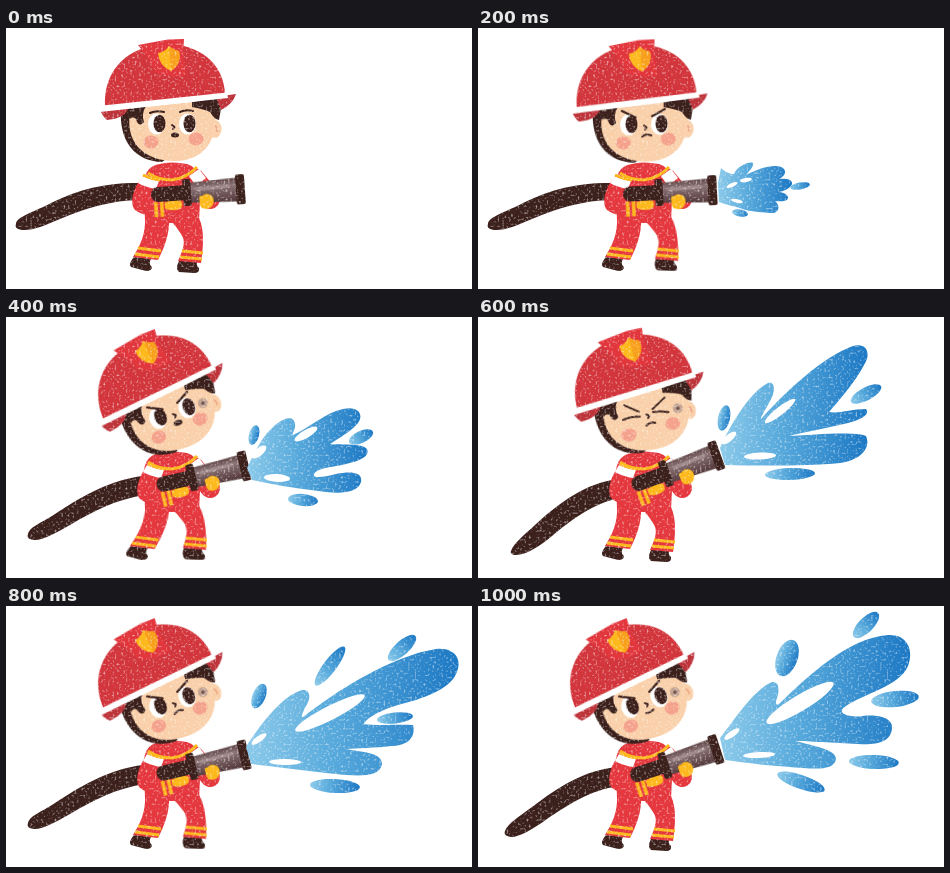
Animation, 466 px wide and 261 px high, one loop 1.2 s. Source, as an HTML page:

```html
<!DOCTYPE html>
<html lang="en">
<head>
<meta charset="utf-8">
<title>Firefighter with hose</title>
<style>
html, body { margin: 0; width: 100%; height: 100%; overflow: hidden; background: #fff; }
svg { display: block; width: 100%; height: 100%; }

/* one pose = 200 ms of a 1200 ms loop */
.p { opacity: 0; animation: show 1.2s step-end infinite; }
.p1 { animation-delay: -1s; }
.p2 { animation-delay: -.8s; }
.p3 { animation-delay: -.6s; }
.p4 { animation-delay: -.4s; }
.p5 { animation-delay: -.2s; }
@keyframes show { 0% { opacity: 1 } 16.66% { opacity: 0 } }

#head, #gun, #hose, #arm, #legL, #legR, #smudge { animation: 1.2s step-end infinite; }
#head { transform-origin: 168px 95px; animation-name: head; }
#gun { animation-name: gun; }
#hose { animation-name: hose; }
#arm { animation-name: arm; }
#legL { transform-origin: 150px 193px; animation-name: legL; }
#legR { transform-origin: 180px 193px; animation-name: legR; }
#smudge { animation-name: smudge; }

@keyframes head {
  0% { transform: none }
  16.66% { transform: translate(0, .5px) rotate(-1deg) }
  33.33%, 66.66%, 83.33% { transform: translate(0, -.5px) rotate(-20deg) }
  50% { transform: translate(2px, 0) rotate(-11deg) }
}
@keyframes gun {
  0% { transform: translate(181px, 165px) rotate(-4deg) }
  16.66% { transform: translate(181px, 165px) rotate(-3deg) }
  33.33%, 66.66% { transform: translate(186px, 161px) rotate(-13deg) }
  50% { transform: translate(188px, 157px) rotate(-20deg) }
  83.33% { transform: translate(187px, 160px) rotate(-18deg) }
}
@keyframes hose {
  0%, 16.66% { d: path("M10 196C10 189 28 184 45 175C75 160 105 154 134 155L134 172C105 172 78 181 54 191C40 197 26 203 16 202C10 201 9 199 10 196Z") }
  33.33%, 66.66% { d: path("M22 217C24 209 38 205 52 195C80 177 105 163 137 159L140 178C110 182 88 194 64 208C50 216 36 224 27 223C22 222 21 220 22 217Z") }
  50% { d: path("M33 234C36 226 45 219 57 208C82 185 108 166 140 162L142 181C115 186 92 204 74 219C62 229 48 238 38 238C34 238 32 236 33 234Z") }
  83.33% { d: path("M27 225C30 217 42 210 54 201C82 180 105 165 138 161L141 180C112 184 90 199 69 213C55 223 42 231 33 231C27 230 26 228 27 225Z") }
}
@keyframes arm {
  0%, 16.66% { transform: none }
  33.33% { transform: translate(5px, 0) }
}
@keyframes legL {
  0%, 50% { transform: none }
  33.33% { transform: skewX(-5deg) }
}
@keyframes legR {
  0%, 50%, 83.33% { transform: none }
  16.66%, 33.33%, 66.66% { transform: translate(0, -2px) skewX(7deg) }
}
@keyframes smudge { 0% { opacity: 0 } 33.33% { opacity: 1 } }

.red { fill: #e5383e; }
.helmet { fill: #d2363c; }
.brim { fill: #bd343a; }
.dark { fill: #3b201c; }
.gold { fill: #fdb91c; }
.skin { fill: #f9d0a9; }
.cheek { fill: #f5a28c; }
.line { fill: none; stroke: #3b201c; stroke-width: 2; stroke-linecap: round; stroke-linejoin: round; }
.band { fill: none; stroke: #fdb91c; stroke-width: 3; }
.water { fill: url(#sea); }
.white { fill: #fff; }
</style>
</head>
<body>
<svg viewBox="0 0 466 261" preserveAspectRatio="none">
<defs>
  <linearGradient id="sea">
    <stop offset="0" stop-color="#8ccaea"/>
    <stop offset=".4" stop-color="#58aadc"/>
    <stop offset="1" stop-color="#1c78c4"/>
  </linearGradient>
  <linearGradient id="steel" x2="0" y2="1">
    <stop offset="0" stop-color="#5b4142"/>
    <stop offset=".3" stop-color="#8b7375"/>
    <stop offset=".55" stop-color="#765d5f"/>
    <stop offset="1" stop-color="#513638"/>
  </linearGradient>
  <!-- chalky brush grain -->
  <filter id="grain" filterUnits="userSpaceOnUse" x="0" y="0" width="466" height="261" color-interpolation-filters="sRGB">
    <feTurbulence type="fractalNoise" baseFrequency=".45" numOctaves="1" seed="4"/>
    <feColorMatrix values="0 0 0 0 1  0 0 0 0 1  0 0 0 0 1  2 0 0 0 -1.08"/>
    <feComposite in2="SourceGraphic" operator="in" result="specks"/>
    <feMerge><feMergeNode in="SourceGraphic"/><feMergeNode in="specks"/></feMerge>
  </filter>
  <g id="eyes">
    <ellipse class="white" cx="150.500" cy="96" rx="8.500" ry="10.500"/>
    <ellipse class="white" cx="181.500" cy="96" rx="8.500" ry="10.500"/>
    <ellipse class="dark" cx="153.500" cy="95.500" rx="6" ry="8.800"/>
    <ellipse class="dark" cx="183.500" cy="95.500" rx="6" ry="8.800"/>
  </g>
  <path id="frown" class="line" d="M144 82L158 89M174 88L187 81"/>
  <path id="sulk" class="line" d="M164 108Q168 104.500 173 107"/>
</defs>

<g filter="url(#grain)">
<path id="hose" class="dark" d="M10 196C10 189 28 184 45 175C75 160 105 154 134 155L134 172C105 172 78 181 54 191C40 197 26 203 16 202C10 201 9 199 10 196Z"/>

<!-- legs -->
<g id="legR">
  <path class="dark" d="M173 233L191 233Q190 238 193 240Q194 245 188 245L173 244Q169 241 173 233Z"/>
  <path class="red" d="M164 190L193 190C199 203 197 220 195 235L172 233C178 220 180 213 175 206Q170 198 164 192Z"/>
  <path class="band" d="M176 223L197 225M174 229L196 231"/>
</g>
<g id="legL">
  <path class="dark" d="M128 229L145 231Q142 236 146 239Q146 243 140 243L125 239Q122 236 128 229Z"/>
  <path class="red" d="M139 189L163 190C164 206 158 220 152 232L127 229C134 218 140 206 139 189Z"/>
  <path class="band" d="M132 220L155 223M129 226L153 229"/>
</g>

<!-- jacket -->
<path d="M188 150Q197 160 204 171" fill="none" stroke="#e5383e" stroke-width="20" stroke-linecap="round"/>
<path class="red" d="M147 138Q162 132 181 136Q192 139 195 153L193 193Q166 197 139 193L138 156Q138 143 147 138Z"/>
<path class="white" d="M183 148L193 141L200 150L190 158Z"/>
<path class="band" d="M142 145Q152 152 166 152Q181 150 191 139"/>
<g id="arm">
  <path class="red" d="M138 147C127 158 123 176 129 182Q138 189 151 187L151 170L145 168L153 152Z"/>
  <path class="white" d="M136 148Q144 152 153 153L150 161Q139 159 132 155Z"/>
  <path class="band" d="M137 147Q145 151 154 152" stroke-width="2"/>
</g>

<!-- nozzle -->
<g id="gun">
  <path class="red" d="M-42 5H-22V22H-40Z"/>
  <path d="M-32 7V22M-26 7V22" fill="none" stroke="#fdb91c" stroke-width="3.500"/>
  <path class="gold" d="M-23 8Q-12 5 -6 8Q-4 15 -11 16Q-18 17 -23 14Z"/>
  <rect class="dark" x="-36" y="-8" width="44" height="15" rx="7"/>
  <path d="M3 -10L52 -12V12L3 10Z" fill="url(#steel)"/>
  <path d="M10 -3L42 -4" stroke="#a08a8c" stroke-width="3.500" stroke-linecap="round"/>
  <rect class="dark" x="-4" y="-14" width="8" height="27" rx="2"/>
  <rect class="dark" x="49" y="-15" width="9" height="30" rx="2"/>
  <path class="gold" d="M12 9Q11 3 15 4Q18 1 22 3Q27 5 26 11Q24 18 17 17Q11 16 12 9Z"/>
</g>

<!-- head -->
<g id="head">
  <ellipse class="skin" cx="209" cy="101" rx="6.500" ry="9"/>
  <path d="M207 98Q212 97 211 104" fill="none" stroke="#eca584" stroke-width="1.500"/>
  <path class="dark" d="M115 82L130 78C124 105 134 124 160 131L156 134C128 133 113 112 115 82Z"/>
  <path class="skin" d="M125 80L208 72C214 103 205 133 168 133C137 133 117 113 125 80Z"/>
  <path class="dark" d="M119 82L140 78Q135 86 138 94Q134 99 131 94Q129 87 124 91Z"/>
  <path class="dark" d="M186 74L217 69Q215 80 213 92Q208 91 204 84Q197 81 186 79Z"/>
  <ellipse class="cheek" cx="145" cy="114" rx="7.500" ry="6.500"/>
  <ellipse class="cheek" cx="190" cy="111" rx="7.500" ry="6.500"/>
  <path class="line" d="M166 97L168.500 99L167 101"/>
  <g id="smudge">
    <circle cx="198" cy="97" r="5" fill="#c4a493"/>
    <circle cx="198" cy="97" r="1.800" fill="#6c504a"/>
  </g>

  <g class="p p0">
    <use href="#eyes"/>
    <path class="line" d="M144 85Q150 82 158 84M174 84Q180 81 187 83"/>
    <ellipse class="dark" cx="169" cy="107" rx="4" ry="2.500"/>
  </g>
  <g class="p p1"><use href="#eyes"/><use href="#frown"/><use href="#sulk"/></g>
  <g class="p p2">
    <use href="#eyes"/><use href="#frown"/>
    <ellipse class="dark" cx="168" cy="107" rx="4.500" ry="2.800"/>
  </g>
  <g class="p p3">
    <path class="line" d="M146 84L159 93M142 98Q151 96 159 98M173 93L187 84M173 96Q180 96 188 99"/>
    <use href="#sulk"/>
  </g>
  <g class="p p4"><use href="#eyes"/><use href="#frown"/><use href="#sulk"/></g>
  <g class="p p5">
    <use href="#eyes"/><use href="#frown"/>
    <path class="line" d="M164 107Q168 108 172 106"/>
  </g>

  <path class="brim" d="M94 81L123 78Q121 90 101 92Q96 88 94 81Z"/>
  <path class="brim" d="M210 69L230 66Q227 76 215 82Z"/>
  <path class="helmet" d="M99 79C97 45 118 22 150 17C185 12 218 30 219 67Z"/>
  <path class="white" d="M92 78L221 64.500L222 70L94 84Z"/>
  <path d="M132 17L162 11.500L178 11Q176 28 181 47Q165 51 149 44Q143 30 132 17Z" fill="#e2363d"/>
  <path class="gold" d="M152 25Q159 24 163 18Q167 22 173 23Q176 36 165 43Q153 38 152 25Z"/>
  <path d="M163 18Q167 22 173 23Q176 36 165 43Z" fill="#f8a01c"/>
</g>

<!-- water -->
<g class="p p1">
  <path class="water" d="M240 155L243 140Q249 146 256 146C259 138 272 133 275 135C276 139 270 144 268 147C280 140 301 134 306 141C309 145 305 149 301 151C307 150 315 151 314 156C313 160 306 163 301 164C308 165 312 168 309 172C305 174 300 173 297 173C303 178 301 186 292 185C280 184 268 183 262 180C254 178 246 176 241 174Z"/>
  <ellipse class="water" cx="322" cy="158" rx="10" ry="3.500" transform="rotate(-10 322 158)"/>
  <ellipse class="water" cx="262" cy="185" rx="8" ry="3.500" transform="rotate(10 262 185)"/>
  <ellipse class="white" cx="254" cy="157" rx="6" ry="2" transform="rotate(-25 254 157)"/>
  <ellipse class="white" cx="268" cy="152" rx="6" ry="2" transform="rotate(-10 268 152)"/>
  <ellipse class="white" cx="259" cy="173" rx="6" ry="1.800" transform="rotate(12 259 173)"/>
</g>
<g class="p p2">
  <path class="water" d="M241 151C247 140 255 118 272 106C280 100 288 99 289 107C290 112 285 117 287 118C305 110 320 95 337 92C350 89 356 95 354 102C352 110 335 120 324 127C335 128 356 126 361 132C364 139 355 144 340 147C330 150 312 150 308 157C306 162 318 160 330 157C345 154 357 155 355 165C352 175 338 177 320 175C295 172 268 168 246 163Z"/>
  <ellipse class="water" cx="248" cy="118" rx="5" ry="10" transform="rotate(15 248 118)"/>
  <ellipse class="water" cx="355" cy="120" rx="13" ry="6" transform="rotate(-25 355 120)"/>
  <ellipse class="water" cx="297" cy="183" rx="15" ry="6" transform="rotate(5 297 183)"/>
  <ellipse class="white" cx="300" cy="117" rx="13" ry="4" transform="rotate(-30 300 117)"/>
  <ellipse class="white" cx="271" cy="161" rx="13" ry="4" transform="rotate(3 271 161)"/>
  <ellipse class="white" cx="253" cy="135" rx="9" ry="4" transform="rotate(-40 253 135)"/>
</g>
<g class="p p3">
  <path class="water" d="M242 131C252 108 272 75 290 66C298 64 297 76 292 84C288 92 282 101 283 102C310 72 345 40 375 29C390 25 393 38 386 48C378 64 362 82 351 95C360 97 374 92 388 92C392 97 385 102 370 106C350 111 326 115 311 119C335 118 375 114 388 119C393 130 384 143 362 146C330 149 285 149 247 148Z"/>
  <ellipse class="water" cx="246" cy="101" rx="6" ry="13" transform="rotate(12 246 101)"/>
  <ellipse class="water" cx="388" cy="77" rx="17" ry="6.500" transform="rotate(-28 388 77)"/>
  <ellipse class="water" cx="312" cy="157" rx="25" ry="6" transform="rotate(-2 312 157)"/>
  <ellipse class="white" cx="302" cy="94" rx="19" ry="4" transform="rotate(-38 302 94)"/>
  <ellipse class="white" cx="282" cy="139" rx="16" ry="3.500" transform="rotate(-3 282 139)"/>
  <ellipse class="white" cx="251" cy="121" rx="9" ry="3.500" transform="rotate(-40 251 121)"/>
</g>
<g class="p p4">
  <path class="water" d="M240 141C252 122 275 90 296 84C305 83 305 93 300 100C297 106 294 112 297 111C330 85 385 50 430 43C450 41 457 55 450 68C443 84 416 93 392 99C375 104 360 112 358 118C370 120 395 118 407 119C410 130 403 140 385 140C370 142 350 142 340 143C355 146 376 146 376 158C374 170 358 170 340 169C310 166 270 161 245 158Z"/>
  <ellipse class="water" cx="253" cy="90" rx="6.500" ry="13" transform="rotate(22 253 90)"/>
  <ellipse class="water" cx="324" cy="60" rx="24" ry="6.500" transform="rotate(-53 324 60)"/>
  <ellipse class="water" cx="396" cy="42" rx="18" ry="7" transform="rotate(-42 396 42)"/>
  <ellipse class="water" cx="389" cy="112" rx="18" ry="5.500" transform="rotate(-6 389 112)"/>
  <ellipse class="water" cx="329" cy="180" rx="25" ry="7" transform="rotate(3 329 180)"/>
  <ellipse class="white" cx="324" cy="107" rx="39" ry="7" transform="rotate(-27 324 107)"/>
  <ellipse class="white" cx="279" cy="156" rx="16" ry="3" transform="rotate(1 279 156)"/>
  <ellipse class="white" cx="253" cy="133" rx="9" ry="3" transform="rotate(-35 253 133)"/>
</g>
<g class="p p5">
  <path class="water" d="M242 132C255 116 275 84 294 76C301 75 302 84 299 92C297 97 298 100 301 98C330 70 370 32 410 29C430 28 436 45 430 60C422 80 385 88 368 100C355 108 375 112 385 110C400 108 415 112 414 122C413 136 400 139 380 138C355 137 330 135 318 135C335 140 358 143 358 153C356 164 340 163 325 162C295 160 268 157 247 154Z"/>
  <ellipse class="water" cx="309" cy="52" rx="10.500" ry="19" transform="rotate(20 309 52)"/>
  <ellipse class="water" cx="388" cy="19" rx="17" ry="7.500" transform="rotate(-45 388 19)"/>
  <ellipse class="water" cx="417" cy="93" rx="24" ry="8" transform="rotate(-6 417 93)"/>
  <ellipse class="water" cx="396" cy="156" rx="25" ry="7" transform="rotate(2 396 156)"/>
  <ellipse class="water" cx="323" cy="176" rx="25" ry="7" transform="rotate(19 323 176)"/>
  <ellipse class="white" cx="322" cy="97" rx="39" ry="8" transform="rotate(-31 322 97)"/>
  <ellipse class="white" cx="281" cy="149" rx="16" ry="3" transform="rotate(-3 281 149)"/>
  <ellipse class="white" cx="254" cy="128" rx="9" ry="3" transform="rotate(-35 254 128)"/>
</g>
</g>
</svg>
</body>
</html>
```
